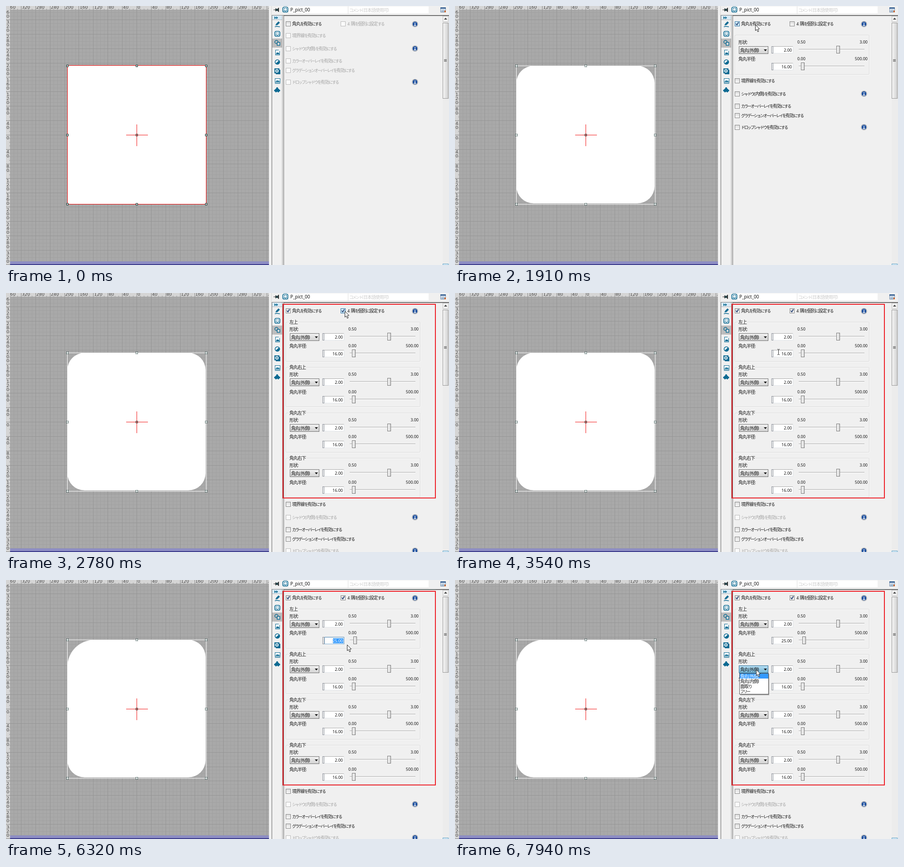
An HTML page with a canvas that plays this animation: 977 by 573 pixels, repeating every 8000 ms.

```html
<!DOCTYPE html>
<html lang="ja">
<head>
<meta charset="utf-8">
<style>
html,body{margin:0;width:100%;height:100%;overflow:hidden;background:#f0f0f0}
canvas{display:block}
</style>
</head>
<body>
<canvas id="c" width="977" height="573"></canvas>
<script>
const g = document.getElementById('c').getContext('2d');
const LOOP = 8000, TEAL = '#0c6a92', DARK = '#151515', DIM = '#a3a3a3';
const CX = 288, CY = 285, UNIT = 7.97;

const box = (x, y, w, h, c) => { g.fillStyle = c; g.fillRect(x, y, w, h); };
const frame = (x, y, w, h, c) => { g.strokeStyle = c; g.lineWidth = 1; g.strokeRect(x + .5, y + .5, w - 1, h - 1); };
const panel = (x, y, w, h, fill, edge) => { box(x, y, w, h, fill); frame(x, y, w, h, edge); };
const disc = (x, y, r, c) => { g.fillStyle = c; g.beginPath(); g.arc(x, y, r, 0, 7); g.fill(); };
const ring = (x, y, r, c, w = 1) => { g.strokeStyle = c; g.lineWidth = w; g.beginPath(); g.arc(x, y, r, 0, 7); g.stroke(); };
function poly(pts, fill, edge, w = 1) {
  g.beginPath();
  for (let i = 0; i < pts.length; i += 2) g.lineTo(pts[i], pts[i + 1]);
  if (fill) { g.closePath(); g.fillStyle = fill; g.fill(); }
  if (edge) { g.strokeStyle = edge; g.lineWidth = w; g.stroke(); }
}
function shade(x, y, w, h, a, b, across) {
  const q = across ? g.createLinearGradient(x, 0, x + w, 0) : g.createLinearGradient(0, y, 0, y + h);
  q.addColorStop(0, a); q.addColorStop(1, b);
  return q;
}
function clipped(x, y, w, h, fn) {
  g.save(); g.beginPath(); g.rect(x, y, w, h); g.clip(); fn(); g.restore();
}

// Compact UI text: kanji, kana and latin runs have their own size and tracking.
const RUN = /[\u3040-\u30ff]+|[\u4e00-\u9fff]+|[^\u3040-\u30ff\u4e00-\u9fff]+/g;
function setRun(s, latin) {
  const kana = /[\u3040-\u30ff]/.test(s), kanji = /[\u4e00-\u9fff]/.test(s);
  g.font = kanji ? '10px "Noto Sans CJK JP","Noto Sans CJK",sans-serif'
    : kana ? '9px "Noto Sans CJK JP","Noto Sans CJK",sans-serif'
    : latin + 'px "Noto Sans",sans-serif';
  g.letterSpacing = kanji ? '-1px' : kana ? '-2px' : '0px';
  return kana || kanji ? 4 : 3.5;
}
function text(s, x, y, color = DARK, right = false, latin = 9) {
  const runs = s.match(RUN) || [];
  g.textAlign = 'left'; g.textBaseline = 'alphabetic';
  if (right) for (const r of runs) { setRun(r, latin); x -= g.measureText(r).width; }
  g.fillStyle = color;
  for (const r of runs) {
    const dy = setRun(r, latin);
    g.fillText(r, x, y + dy);
    x += g.measureText(r).width;
  }
  g.letterSpacing = '0px';
}

// Pointer moves: start, end, number of steps, target; each step is held.
const moves = [
  [380, 1060, 10, 632, 41],
  [1760, 2150, 6, 747, 40],
  [3090, 3540, 7, 713, 130],
  [3620, 3850, 4, 705, 136],
  [3920, 4000, 2, 758, 140],
  [6320, 6790, 7, 653, 190],
  [7100, 7180, 2, 662, 195],
  [7320, 7550, 4, 650, 195],
  [7860, 7940, 2, 664, 198]
];
function pointer(t) {
  if (t < 380 || (t >= 4760 && t < 6320)) return null;
  let x = 802, y = 362;
  for (const [a, b, n, tx, ty] of moves) {
    if (t < a) break;
    const k = Math.min(n - 1, Math.floor((t - a) / (b - a) * (n - 1) + .05));
    let p = a === 380 ? k / (n - 1) : (k + 1) / n;
    p = a === 380 ? 1 - (1 - p) ** 2 : n > 4 ? p * p * (3 - 2 * p) : p;
    x += (tx - x) * p; y += (ty - y) * p;
  }
  const beam = t < 4220 && (t >= 3920 || (x > 701 && x < 746 && y > 125 && y < 143));
  if (t >= 4220 && t < 4760) { x = 757; y = 139; }
  return { x: Math.round(x), y: Math.round(y), beam };
}
function drawPointer(p) {
  if (!p) return;
  const { x, y } = p;
  if (p.beam) {
    box(x, y - 5, 1, 11, '#222');
    box(x - 2, y - 6, 2, 1, '#222'); box(x + 1, y - 6, 2, 1, '#222');
    box(x - 2, y + 6, 2, 1, '#222'); box(x + 1, y + 6, 2, 1, '#222');
    return;
  }
  const s = [0, 0, 0, 13, 3, 10.3, 5.2, 15.5, 7.4, 14.5, 5.3, 9.6, 9, 9.2, 0, 0];
  poly(s.map((v, i) => v + (i % 2 ? y : x) + .5), '#fff', '#222', 1);
}
const over = (p, x, y, w, h) => !!p && p.x >= x && p.x < x + w && p.y >= y && p.y < y + h;

function workspace(t) {
  box(0, 0, 580, 573, '#a9a9a9');
  for (const major of [false, true]) for (let k = -36; k <= 36; k++) {
    if ((k % 4 === 0) !== major) continue;
    const c = major ? '#959595' : '#a1a1a1';
    box(Math.round(CX + k * UNIT), 8, 1, 565, c);
    box(9, Math.round(CY + k * UNIT), 571, 1, c);
  }
  drawShape(t);
  box(9, 565, 571, 8, '#8e8ec4'); box(9, 571, 571, 2, '#3b3b8c');
  box(0, 0, 580, 8, '#d5d5d5'); box(0, 0, 9, 573, '#d5d5d5');
  g.font = '9.5px "DejaVu Sans",sans-serif';
  g.textAlign = 'left';
  clipped(9, 0, 571, 8, () => {
    for (let k = -9; k <= 9; k++) {
      const x = CX + k * UNIT * 4;
      box(Math.round(x), 0, 1, 8, '#888');
      for (let j = 1; j < 4; j++) box(Math.round(x + j * UNIT), 6, 1, 2, '#999');
      g.fillStyle = '#444'; g.fillText(Math.abs(k * 40), x + 2, 6);
    }
  });
  clipped(0, 8, 9, 565, () => {
    for (let k = -9; k <= 9; k++) {
      const y = CY + k * UNIT * 4;
      box(0, Math.round(y), 9, 1, '#888');
      for (let j = 1; j < 4; j++) box(7, Math.round(y + j * UNIT), 2, 1, '#999');
      g.fillStyle = '#444';
      [...String(Math.abs(k * 40))].forEach((d, i) => g.fillText(d, 1, y + 9.5 + i * 9));
    }
  });
}

function drawShape(t) {
  const l = 135, top = 132;
  if (t < 1520) {
    box(l, top, 307, 307, '#fff');
    if (t < 1390) frame(l, top - 1, 307, 308, '#f00000');
  } else {
    const r = 16 * 2.4;
    g.fillStyle = '#fff'; g.beginPath();
    g.roundRect(l, top, 305.5, 305, [t < 5540 ? r : 60, r, r, r]); g.fill();
    g.strokeStyle = 'rgba(150,150,150,.5)'; g.lineWidth = 1; g.stroke();
    frame(l, top, 307, 307, '#fff');
  }
  box(265, CY, 48, 1, '#f21010'); box(CX, 262, 1, 48, '#f21010');
  for (const x of [135, 288, 441]) for (const y of [132, 285, 438]) {
    const mid = x === 288 && y === 285;
    if (!mid) box(x - 2, y - 2, 5, 5, t < 1390 ? '#ccc' : '#e8eeee');
    frame(x - 2.5 + .5, y - 2, 5, 5, '#1d3b38');
    if (t >= 1390 && !mid) { box(x, y - 2, 1, 5, '#fff'); box(x - 2, y, 5, 1, '#fff'); }
  }
}

function smiley(x, y) {
  g.strokeStyle = TEAL; g.lineWidth = 1.7; g.beginPath();
  g.roundRect(x - 5.5, y - 5.5, 11, 11, 3); g.fillStyle = '#fff'; g.fill(); g.stroke();
  box(x - 3, y - 3, 2, 2, TEAL); box(x + 1, y - 3, 2, 2, TEAL);
  g.lineWidth = 1.4; g.beginPath(); g.arc(x, y, 3.3, .2, 2.94); g.stroke();
}
function picture(x, y, w, h) {
  panel(x - w / 2, y - h / 2, w, h, '#fff', TEAL);
  poly([x - w / 2 + 1, y + h / 2 - 2, x - 1, y - 1, x + 1, y + 1, x + 2.5, y - .5, x + w / 2 - 1, y + h / 2 - 2], TEAL);
}
function tools() {
  box(587, 21, 22, 9, '#d9eaf5');
  for (const x of [592, 596]) poly([x, 23, x + 4, 26, x, 29], TEAL);
  box(587, 30, 22, 1, '#b8b8b8');
  box(587, 72, 22, 20, '#bdbdbd');
  poly([594, 43, 596, 39, 601, 34, 604, 37, 599, 42], TEAL);
  poly([593, 46, 597, 45, 604, 46], null, TEAL, 1.5);
  smiley(598.5, 61.5);
  ring(596.5, 79.5, 3.6, TEAL, 1.5);
  box(598, 80, 7, 8, '#d7d7d7'); g.strokeStyle = TEAL; g.lineWidth = 1.5; g.strokeRect(598, 80.5, 6, 6.5);
  picture(599, 103, 10, 12);
  poly([601, 97, 604, 97, 604, 100], '#f0f0f0');
  disc(598.5, 124, 5.8, TEAL);
  g.fillStyle = '#fff'; g.beginPath(); g.arc(598.5, 124, 4, 2.5, 5.5); g.fill();
  box(595, 141, 10, 10, TEAL); panel(592, 138, 11, 11, TEAL, TEAL);
  ring(597.5, 143.5, 3, '#fff', 1.6); disc(597.5, 143.5, 1, '#fff');
  picture(599, 165, 12, 10); box(593, 171, 12, 1, TEAL);
  box(594, 183, 8, 8, TEAL);
  for (const [x, y] of [[598, 182], [602.5, 187], [593.5, 187]]) disc(x, y, 2.2, TEAL);
  disc(598, 191, 1.5, '#f0f0f0');
}

function chrome() {
  box(580, 0, 397, 573, '#f0f0f0');
  box(580, 0, 1, 573, '#fafafa'); box(585, 0, 1, 573, '#d8d8d8');
  box(586, 20, 391, 1, '#808080'); box(586, 20, 1, 553, '#777');
  box(609, 21, 1, 552, '#9a9a9a'); box(612, 21, 1, 552, '#5c5c5c'); box(612, 21, 365, 1, '#5c5c5c');
  box(590, 8, 4, 1, '#333'); box(594, 5, 1, 7, '#333'); box(595, 6, 5, 5, '#2d4a4f'); box(600, 4, 2, 9, '#333');
  smiley(616, 8);
  box(624, 1, 130, 16, '#fff'); box(755, 1, 177, 16, '#fff');
  box(624, 17, 308, 1, '#dedede'); box(754, 1, 1, 16, '#dedede');
  text('P_pict_00', 627, 8.5, DARK, false, 10);
  text('コメント(日本語使用可)', 757, 8.5, '#cbcbcb');
  panel(958, 3, 12, 11, '#e9f0f8', '#6b86a5'); box(958, 3, 12, 3, '#355f91');
  for (let y = 8; y < 13; y += 2) box(960, y, 8, 1, '#7f9bb8');
  box(967, 10, 3, 4, '#c8642e');
  tools();
  box(963, 22, 14, 551, '#ececec');
  panel(963, 22, 13, 13, '#f1f1f1', '#c4c4c4');
  poly([966, 30, 969.5, 26, 973, 30], '#444');
  panel(963, 37, 13, 168, shade(963, 0, 13, 1, '#f8f8f8', '#cfcfcf', true), '#979797');
  for (let y = 118; y < 124; y += 2) box(966, y, 6, 1, '#555');
  panel(963, 570, 13, 6, '#cfe7f5', '#6aa7c8');
}

function check(x, y, on, enabled, hot, pressed) {
  const fill = !enabled ? '#fafafa' : pressed ? shade(x, y - 5, 11, 11, '#9ed3f2', '#d8f0fc')
    : hot ? '#d3edfb' : shade(x, y - 5, 11, 11, '#dcdcdc', '#fafafa');
  panel(x, y - 5, 11, 11, fill, !enabled ? '#b9b9b9' : hot ? '#2f709f' : '#858585');
  if (on) poly([x + 2.5, y, x + 4.8, y + 3, x + 8.3, y - 3], null, '#233f70', 1.8);
}
function info(y) {
  disc(902, y, 6.6, '#8a8f98'); disc(902, y, 5.6, '#d7dde6'); disc(902, y, 5, '#1c4f9f');
  box(901, y - 3, 2, 2, '#fff'); box(901, y, 2, 4, '#fff'); box(900, y + 3, 4, 1, '#fff');
}
const effects = [
  [65, '境界線を有効にする'], [94, 'シャドウ(内側)を有効にする'], [121, 'カラーオーバーレイを有効にする'],
  [142, 'グラデーションオーバーレイを有効にする'], [168, 'ドロップシャドウを有効にする']
];
function effectRows(dy, enabled, infos = true) {
  effects.forEach(([y, s], i) => {
    const on = enabled(i);
    check(617, y + dy, false, on);
    text(s, 631, y + dy, on ? DARK : DIM);
    if (infos && (i === 1 || i === 4)) info(y + dy);
  });
}

function combo(y, hot, pressed) {
  const fill = pressed ? shade(0, y - 8, 1, 17, '#b9dff3', '#6fb5d8')
    : hot ? shade(0, y - 8, 1, 17, '#e6f5fd', '#a9daf4') : shade(0, y - 8, 1, 17, '#f3f3f3', '#d0d0d0');
  panel(626, y - 8, 65, 17, fill, hot || pressed ? '#2f6d94' : '#707070');
  text('角丸(外側)', 629, y + .5);
  poly([681, y - 1, 688, y - 1, 684.5, y + 3], '#111');
}
function field(y, value, focus) {
  box(702, y - 8, 44, 16, '#fff');
  box(702, y - 8, 44, 1, focus ? '#3d7bad' : '#ababab');
  box(702, y + 7, 44, 1, focus ? '#7fb0d6' : '#e2e6ea');
  if (focus) { box(702, y - 8, 1, 16, '#7fa8c8'); box(745, y - 8, 1, 16, '#5a8fba'); }
  else box(745, y - 8, 1, 16, '#dfe3e8');
  text(value, 743, y, DARK, true);
}
function slider(y, x) {
  box(758, y - 1, 145, 1, '#b5b5b5'); box(758, y, 145, 2, '#e9e9e9'); box(758, y + 1, 145, 1, '#fcfcfc');
  panel(x - 4, y - 8, 8, 17, shade(x - 4, 0, 8, 1, '#fafafa', '#d2d2d2', true), '#777');
}
function group(y, h) {
  g.lineWidth = 1; g.strokeStyle = '#fbfbfb'; g.beginPath(); g.roundRect(618.5, y + 1.5, 296, h, 2); g.stroke();
  g.strokeStyle = '#d9d9d9'; g.beginPath(); g.roundRect(617.5, y + .5, 296, h, 2); g.stroke();
}
function corner(top, row, title, st) {
  group(top, 87);
  if (title) {
    box(623, top - 4, title.length * 9 + 2, 9, '#f0f0f0');
    text(title, 625, top);
  }
  text('形状:', 625, top + 15.5); text('0.50', 755, top + 15); text('3.00', 910, top + 15, DARK, true);
  combo(top + 33, st.hot, st.pressed);
  field(top + 33, '2.00');
  text('角丸半径:', 625, row + .5); text('0.00', 755, row); text('500.00', 910, row, DARK, true);
  field(row + 18, st.value || '16.00', st.focus);
  if (st.bare) return;
  for (const y of [top + 25, row + 10]) panel(698, y, 4, 16, '#f6f6f6', '#8a8f98');
  slider(top + 32, 845);
  slider(row + 17, st.value === '25.00' ? 770 : 767);
}

// Half-repainted panel, shown briefly while the form grows.
function torn() {
  corner(64, 116, '', { bare: true });
  clipped(613, 152, 81, 120, () => effectRows(100, () => true, false));
  clipped(694, 255, 15, 20, () => effectRows(100, () => true, false));
  clipped(694, 157, 60, 16, () => effectRows(100, () => true, false));
  for (const y of [190, 290, 328]) { frame(702, y, 44, 16, '#d2d2d2'); box(702, y, 44, 1, '#aaa'); }
  box(702, 229, 44, 1, '#b0b0b0');
  clipped(702, 186, 40, 18, () => text(effects[1][1], 631, 194));
  clipped(702, 236, 43, 9, () => text(effects[3][1], 631, 242));
  clipped(709, 460, 40, 18, () => text(effects[4][1], 631, 469));
  info(469);
}

function radius(t, focus) {
  const typed = t >= 4760 && t < 5540;
  const value = t < 4760 ? '16.00' : t < 4990 ? '2' : t < 5540 ? '25' : '25.00';
  const sel = t >= 3920 && t < 7320 && !typed;
  if (sel) {
    const w = t < 4000 ? 13 : 23;
    box(721, 129, w, 11, '#3399ff');
    clipped(721, 126, w, 16, () => text(value, 743, 134, '#fff', true));
  }
  const on = typed || (t >= 4000 && t < 4450) || (t >= 5540 && (t - 5500) % 1000 < 500);
  if (focus && on) box(742, 128, 1, 11, typed ? '#111' : '#cc6600');
}

function dropdown(t) {
  const open = [0, .4, .75, 1][Math.min(3, Math.floor((t - 7320) / 76.6 + .01))];
  if (!open) return;
  const h = Math.round(47 * open);
  box(629, 208, 64, h, 'rgba(0,0,0,.3)');
  clipped(627, 206, 65, h, () => {
    panel(627, 206, 65, h, '#fff', '#555');
    box(628, 207, 63, 11, '#3399ff');
    ['角丸(外側)', '角丸(内側)', '面取り', 'フリー'].forEach((s, i) =>
      text(s, 629, 212.5 + i * 11.3, i ? DARK : '#fff'));
  });
}

function draw(t) {
  workspace(t);
  chrome();
  const p = pointer(t);
  const split = t >= 2700, rounded = t >= 1520;
  check(617, 39, rounded, true, over(p, 617, 33, 80, 14), t >= 1390 && t < 1520);
  text('角丸を有効にする', 631, 39);
  check(738, 39, split, rounded, rounded && over(p, 738, 33, 97, 14), t >= 2470 && t < 2700);
  text('4 隅を個別に設定する', 753, 39, rounded ? DARK : DIM);
  info(40);
  if (!rounded) effectRows(0, () => false);
  else if (t < 2630) {
    corner(64, 116, '', {});
    effectRows(100, () => true);
  } else if (!split) torn();
  else {
    const focus = t >= 3920 && t < 7320;
    const value = t < 4760 ? '16.00' : t < 4990 ? '2' : t < 5540 ? '25' : '25.00';
    corner(64, 116, '左上', { value, focus });
    radius(t, focus);
    corner(164, 218, '角丸右上', { hot: over(p, 626, 189, 65, 17), pressed: t >= 7320 });
    corner(265, 317, '角丸左下', {});
    corner(365, 418, '角丸右下', {});
    effectRows(402, i => i !== 1 && i !== 4);
    if (t >= 2780) { g.strokeStyle = '#ee1c24'; g.lineWidth = 2; g.strokeRect(611, 25, 336, 428.5); }
    if (t >= 7320) dropdown(t);
  }
  drawPointer(p);
}

const start = performance.now();
function tick() {
  draw((performance.now() - start) % LOOP);
  requestAnimationFrame(tick);
}
tick();
</script>
</body>
</html>
```
